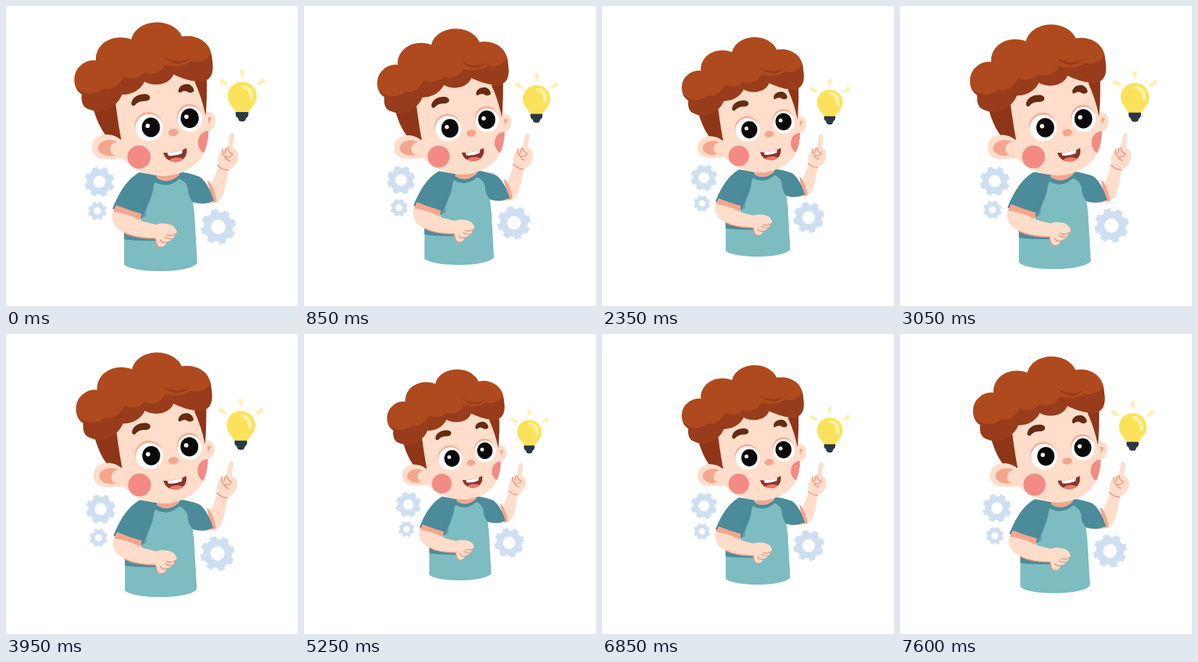
Animation of 403 by 413 pixels, one loop 7.65 s. Source, as an HTML page:

```html
<!DOCTYPE html>
<html lang="en">
<head>
<meta charset="utf-8">
<title>Bright idea</title>
<style>
  html, body { margin: 0; width: 100%; height: 100%; overflow: hidden; background: #fff; }
  svg { display: block; width: 100vw; height: 100vh; }
  .skin { fill: #feddca; }
  .blush { fill: #f38a83; }
  .shade { fill: #f4a68c; }
  .hair { fill: #ae4a1d; }
  .dark { fill: #983c1b; }
  .back { fill: #8f3618; }
  .brow { fill: #652c13; }
  .body { fill: #7dbcc0; }
  .sleeve { fill: #4b8b9a; }
  .gear { fill: #cfdff2; fill-rule: evenodd; }
  .ray { fill: #fdf0b2; }
  .line { fill: none; stroke: #ee957c; stroke-width: 1.5; stroke-linecap: round; }
</style>
</head>
<body>
<svg viewBox="0 0 403 413">
  <defs>
    <clipPath id="face"><path id="skull" d="M150 110L146 145L155 184C154 205 166 226 206 233C230 237 254 228 268 211C282 192 281 165 277 140L273 98L200 90Z"/></clipPath>
    <clipPath id="mouth"><path id="lips" d="M217 202Q235 203 249 195.500C251 205 246 213 236 214.500C226 215 219 210 217 202Z"/></clipPath>
  </defs>
  <g id="scene">
    <g id="gears"></g>

    <!-- bulb -->
    <path class="ray" d="M322.500 89Q326 87 329.500 89L327.500 97Q326 99 324.500 97ZM294.500 105Q294 101 297.500 100L306.500 106.500Q307 109.500 304 109.500ZM357.500 105Q358 101 354.500 100L346.500 106.500Q346 109.500 349 109.500Z"/>
    <path fill="#fce25a" d="M326 104.500C337 104.500 346 113 346 124C346 134 339 139 334 147H318C313 139 306 134 306 124C306 113 315 104.500 326 104.500Z"/>
    <path fill="#fdf1a2" d="M326 109C336 108 343 117 341 127C340 131 336 131 336 127C336 119 333 115 327 113C324 112 324 109 326 109Z"/>
    <path fill="#2b3846" d="M317 146H334.500V150Q334 153 331.500 154L330 158Q326 160 321.500 158L320 154Q317.500 153 317 150Z"/>

    <!-- raised arm -->
    <path class="skin" d="M262 268L279 254C285 242 290 230 293 219C291 210 293 202 300 197L306 194L309 178C310 173 316 174 315.500 179L313 195C320 198 322 204 320 211C318 219 313 223 307 226C305 241 302 257 296 266C289 274 274 275 262 268Z"/>
    <path class="line" d="M292 219Q298 226 307 226M299 197Q297 203 302 207Q307 210 312 205M304 196L302 203M306 195Q306 201 313 204M302 207Q303 212 309 213"/>

    <!-- body -->
    <path class="body" d="M187 232L207 234Q222 248 238 231L254 238L260 285L264 354C252 369 176 368 163 356V280Z"/>
    <path class="shade" d="M278 240L285 271L291 269Q289 255 282 243Z"/>
    <path class="sleeve" d="M236 228Q252 229 267 235C277 242 282 254 287 268Q273 275 258 270Q251 262 251 251Q249 241 237 237Z"/>
    <path class="sleeve" d="M203 233Q222 250 239 230L242 235Q222 257 198 237Z"/>
    <path class="shade" d="M206 226H239V233Q222 248 205 234Z"/>
    <path class="sleeve" d="M184 229L208 233Q207 241 204 247C202 262 195 274 188 292L163 286L147 279C155 259 166 239 184 229Z"/>
    <path fill="#4b8b9a" opacity=".55" d="M203 250C203 265 191 278 194 289L182 294L186 270Z"/>
    <path class="sleeve" d="M163 311Q182 321 211 319V323Q181 324 163 321Z"/>

    <!-- folded arm -->
    <path class="skin" d="M148 281L185 290L187 296L207 301C214 298 225 299 231 303C237 309 237 313 233 315C231 322 225 324 222 325C218 334 210 334 208 328L206 320C187 320 170 317 158 309C147 302 144 291 148 281Z"/>
    <path class="shade" d="M152 274Q169 281 187 286L185 295Q169 286 148 283Z"/>
    <path class="line" d="M235 313Q229 318 222 315M231 320Q225 322 219 318M222 325Q217 328 213 322M206 320L208 328Q210 333 216 332M163 312Q178 320 206 320"/>

    <!-- head -->
    <path class="skin" d="M272 148C281 142 290 148 289 159C288 169 281 175 273 172Z"/>
    <path class="shade" d="M276 155Q281 151 284 155Q279 161 278 169Q274 163 276 155Z"/>
    <use href="#skull" class="skin"/>
    <g clip-path="url(#face)">
      <circle class="blush" cx="183.500" cy="208" r="16"/>
      <ellipse class="blush" cx="279" cy="188" rx="14" ry="16"/>
    </g>
    <path class="back" d="M105 118C102 136 109 143 121 143C126 160 132 171 139 180L159 184Q153 152 149 115ZM260 94H277Q278 123 275.500 151Q270 125 261 106Z"/>
    <path class="skin" d="M158 184C148 175 128 174 121 186C115 200 123 211 138 211C148 212 157 209 164 211Z"/>
    <path class="shade" d="M152 186C142 182 129 185 127 195C126 203 138 208 149 206L157 207V190Z"/>
    <path class="skin" d="M160 187C151 185 144 190 144 197C144 204 150 207 160 207Z"/>
    <path class="brow" d="M173 134C174 125 184 120 194 121.500Q200 123 198.500 128Q196 131 190 131C184 131 180 134 177.500 137Q173 138 173 134ZM238 117C238 111 245 106 253 108Q259 111 259.500 117Q256 121 251 118.500C247 116 244 117 241 119Q238 120 238 117Z"/>
    <g id="eyes"></g>
    <ellipse class="shade" cx="231" cy="174" rx="7" ry="5" transform="rotate(-8 231 174)"/>
    <use href="#lips" fill="#8d3429"/>
    <g clip-path="url(#mouth)">
      <ellipse cx="236" cy="214" rx="11" ry="5.500" fill="#ef7770"/>
      <path fill="#fff" d="M222 200L244 195L243 203Q234 207 224 206Z"/>
    </g>

    <!-- hair -->
    <path class="hair" d="M106 122C92 117 90 92 103 82C109 76 117 74 124 75C123 50 150 37 173 46C180 17 230 14 243 42C262 38 285 50 284 73C288 90 284 104 268 104C254 104 240 98 231 94C226 108 205 112 191 104C186 115 174 122 160 122C152 142 126 151 112 140C106 136 104 128 106 122Z"/>
    <path class="dark" d="M97 112C108 124 128 122 135 113C144 117 156 111 162 97C172 102 184 100 190 92C204 97 216 90 219 81C235 85 249 82 255 76C267 80 279 74 283 65C288 87 285 104 268 104C254 104 240 98 231 94C226 108 205 112 191 104C186 115 174 122 160 122C152 142 126 151 112 140C106 136 104 128 106 122Q100 119 97 112Z"/>
    <path class="dark" d="M217 69C227 82 245 82 253 72C243 77 228 77 217 69Z"/>
  </g>
</svg>
<script>
const get = id => document.getElementById(id);

// Toothed wheel with a round hole
function gear(cx, cy, r, hole, turn) {
  const teeth = 8, pts = [];
  for (let i = 0; i < teeth; i++)
    for (const [off, k] of [[-.32, .83], [-.23, 1], [.23, 1], [.32, .83]]) {
      const a = turn + (i + off) * 2 * Math.PI / teeth;
      pts.push((cx + r * k * Math.cos(a)).toFixed(1) + ' ' + (cy + r * k * Math.sin(a)).toFixed(1));
    }
  return `<path class="gear" d="M${pts.join('L')}ZM${cx - hole} ${cy}a${hole} ${hole} 0 1 0 ${2 * hole} 0a${hole} ${hole} 0 1 0 ${-2 * hole} 0Z"/>`;
}

const dot = (cx, cy, rx, ry, fill) =>
  `<ellipse cx="${cx}" cy="${cy}" rx="${rx}" ry="${ry}" fill="${fill}"/>`;

// Lid, white, pupil and glint
const eye = (x, y, rx, ry, px, py) =>
  dot(x - 1, y - 3, rx, ry, '#f3b09a') + dot(x, y, rx, ry, '#fff') +
  dot(px, py, 12.5, 13.5, '#0b0909') + dot(px - 4.5, py - 2, 3, 3, '#fff');

get('gears').innerHTML = gear(129, 242, 21, 8.5, .44) + gear(126, 282, 13, 5, .4) + gear(293, 304, 24.5, 10, .52);
get('eyes').innerHTML = eye(197.5, 167.5, 19, 18.5, 200, 167) + eye(254, 155.5, 17, 17.5, 253.5, 154.5);

const LOOP = 7650, STEP = 50, BEAT = 18, RISE = 6, LOW = .848, RANGE = .304;

// Linear swell, then a quadratic ease back down
function scaleAt(t) {
  const p = (Math.floor(t % LOOP / STEP) + 3) % BEAT;
  const level = p < RISE ? p / RISE : ((BEAT - p) / (BEAT - RISE)) ** 2;
  return LOW + RANGE * level;
}

const start = performance.now();
function draw() {
  const s = scaleAt(performance.now() - start);
  get('scene').setAttribute('transform', `translate(228 195) scale(${s}) translate(-228 -195)`);
  requestAnimationFrame(draw);
}
draw();
</script>
</body>
</html>
```
